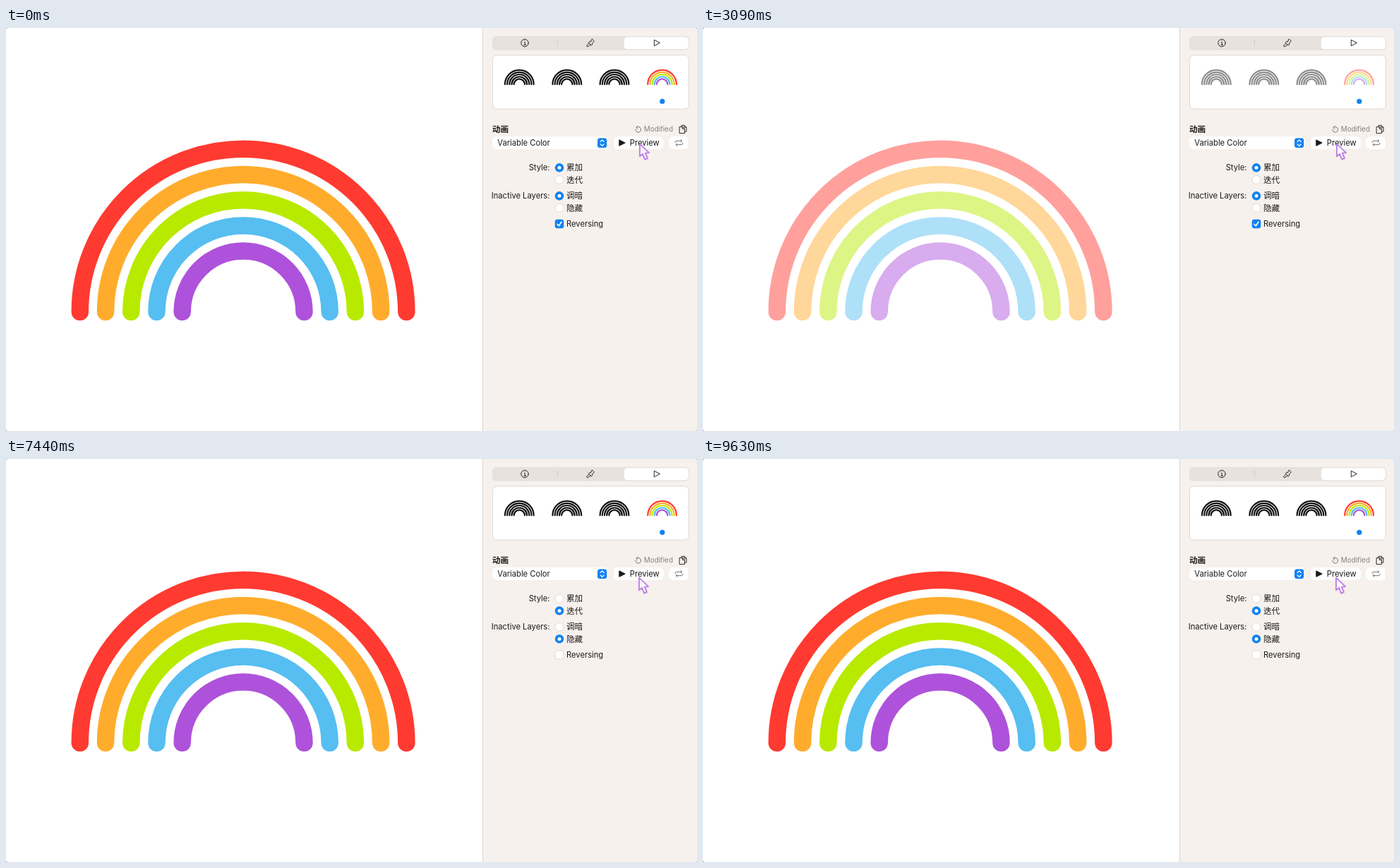
These frames come from a looping animation (979 px wide and 572 px high, 9.78 s). An HTML page:

```html
<!DOCTYPE html>
<html lang="en">
<head>
<meta charset="utf-8">
<title>Variable color preview</title>
<style>
  html, body { margin: 0; width: 100%; height: 100%; overflow: hidden; background: #555; }
  svg { display: block; width: 979px; height: 572px; }
  text { font: 11.2px Inter, "Noto Sans CJK SC", "Noto Sans CJK", sans-serif; fill: #1c1a19; }
  .zh { font: 11.6px "Noto Sans CJK SC", "Noto Sans CJK", sans-serif; }
  .bold { font-weight: 700; }
  .small { font-size: 9.9px; fill: #85807c; }
  .end { text-anchor: end; }
  .line { fill: none; stroke: #2a2827; stroke-linecap: round; stroke-linejoin: round; }
  .soft { stroke: #77726e; }
  .box { fill: #fff; filter: drop-shadow(0 .6px .7px #0003); }
  .arc { fill: none; stroke-width: 24.5; stroke-linecap: round; }
</style>
</head>
<body>
<svg viewBox="0 0 979 572">
  <defs>
    <g id="off"><circle r="6" fill="#fff" stroke="#d9d4cf" stroke-width=".8"/></g>
    <g id="on"><circle r="6.2" fill="#0f82f2"/><circle r="2.5" fill="#fff"/></g>
  </defs>

  <rect width="979" height="572" rx="2" fill="#fff"/>
  <path d="M675 0H977a2 2 0 0 1 2 2V570a2 2 0 0 1-2 2H675Z" fill="#f6f1ed"/>
  <path d="M675.5 0V572" stroke="#d9d5d1"/>

  <!-- tabs -->
  <rect x="689.5" y="12" width="278" height="19" rx="5" fill="#e7e2dd" stroke="#ddd8d3" stroke-width=".6"/>
  <path d="M781.5 16V26" stroke="#d0cbc6"/>
  <rect class="box" x="875.5" y="12.5" width="91.5" height="18" rx="5"/>
  <g class="line">
    <circle cx="735" cy="21.2" r="5.2"/>
    <path d="M734.3 20.6H735.3V23.8M734 23.9H736.5M735 18.4V18.5"/>
    <path d="M918.3 17.2V25.4L926 21.3Z"/>
    <path d="M830.5 15.8L833.4 18.6L830.3 21.8L831 23L829.2 24.6L825.2 20.7L827 18.8L828.1 19.5ZM826 21.5L822.8 24.8Q822.4 26.6 824.3 26.4L828.2 23.6"/>
  </g>

  <rect x="689.5" y="38.5" width="278" height="76.5" rx="6" fill="#fff" stroke="#dfdad6"/>
  <circle cx="929.8" cy="104.2" r="3.6" fill="#0f82f2"/>

  <!-- animation header -->
  <text class="zh bold" x="689" y="148">动画</text>
  <path class="line soft" d="M893.1 141.2A3.9 3.9 0 1 1 891.8 144M895.1 139.1L892.8 141.3L895 143.4"/>
  <text class="small" x="903.8" y="147">Modified</text>
  <path class="line" d="M957 140V138.2H961L964 141V147H961.5M954.5 140.2H958.5L961.4 143V149.4H954.5ZM958.3 140.4V143.2H961.2M961 138.3V141H963.8"/>

  <rect class="box" x="689" y="154" width="164" height="18" rx="5"/>
  <text x="696.3" y="167">Variable Color</text>
  <rect x="838" y="156.3" width="13.3" height="13.6" rx="3.5" fill="#1683f3"/>
  <path d="M842.2 161.3L844.7 158.9L847.2 161.3M842.2 164.9L844.7 167.3L847.2 164.9" class="line" style="stroke:#fff;stroke-width:1.3"/>
  <rect class="box" x="860.5" y="154" width="71.5" height="18" rx="5"/>
  <path d="M868.8 158.8V167.2L877.2 163Z" fill="#1c1a19" stroke="#1c1a19" stroke-linejoin="round"/>
  <text x="883.8" y="167">Preview</text>
  <rect class="box" x="939" y="154" width="28.5" height="18" rx="5"/>
  <path class="line soft" d="M948 162.4Q948 160.2 950 160.2H957.6M955.9 158.4L957.8 160.2L955.9 162M959 163.2Q959 165.6 957 165.6H949.2M951 163.8L949.1 165.6L951 167.4"/>

  <!-- options -->
  <text class="end" x="770.5" y="202">Style:</text>
  <text class="zh" x="794" y="202.3">累加</text>
  <text class="zh" x="794" y="219.5">迭代</text>
  <text class="end" x="770.5" y="242">Inactive Layers:</text>
  <text class="zh" x="794" y="242.3">调暗</text>
  <text class="zh" x="794" y="259.5">隐藏</text>
  <text x="794" y="282">Reversing</text>
  <use href="#off" x="784" y="198.3"/><use href="#off" x="784" y="215.4"/>
  <use href="#off" x="784" y="238.3"/><use href="#off" x="784" y="255.4"/>
  <use href="#on" x="784" y="198.3" id="style"/>
  <use href="#on" x="784" y="238.3" id="inactive"/>
  <rect x="778" y="272" width="12" height="12" rx="3" fill="#fff" stroke="#d9d4cf" stroke-width=".8"/>
  <g id="reversing">
    <rect x="777.8" y="271.8" width="12.4" height="12.4" rx="3" fill="#0f82f2"/>
    <path class="line" d="M781 278.4L783.2 281L787 275.2" style="stroke:#fff;stroke-width:1.6"/>
  </g>

  <g id="rainbows"></g>

  <circle id="ring" r="28.3" fill="#fff" fill-opacity=".12" stroke="#111" stroke-width="1.6"/>
  <path id="cursor" d="M0 0V17.6L4.1 14.2L7.2 22L10.9 20.4L7.7 13L13 12.5Z" fill="#fdf5ff" stroke="#b97be3" stroke-width="1.7" stroke-linejoin="round" style="filter:drop-shadow(.6px .8px .8px #b97be355)"/>
</svg>
<script>
const LOOP = 9780;
const COLORS = ['#ae52db', '#56bef0', '#b8ea00', '#ffac2d', '#ff3a31'];  // inside out
const $ = id => document.getElementById(id);

// Linear track through [time, value] points
function track(points, t, ease = p => p) {
  if (t <= points[0][0]) return points[0][1];
  for (let i = 1; i < points.length; i++) {
    const [a, from] = points[i - 1], [b, to] = points[i];
    if (t < b) return from + (to - from) * ease((t - a) / (b - a));
  }
  return points[points.length - 1][1];
}
const smooth = p => p * p * (3 - 2 * p);

// Cumulative run with reversing and dimming, then an iterative run with hiding
const layerTracks = COLORS.map((_, i) => {
  const rise = 825 + 150 * i, fall = 1950 + 150 * (4 - i);
  const show = 7970 + 190 * i, hide = 8320 + 190 * i;
  return [
    [560, 1], [780, .3], [rise, .3], [rise + 160, 1],
    [fall, 1], [fall + 165, .3], [3000, .3], [3360, 1],
    [7760, 1], [7950, 0], [show, 0], [show + 180, 1],
    [hide, 1], [hide + 180, 0], [9270, 0], [9630, 1]
  ];
});

const layers = COLORS.map(() => []);
function addRainbow(x, y, scale, ink) {
  const NS = 'http://www.w3.org/2000/svg';
  const group = document.createElementNS(NS, 'g');
  group.setAttribute('transform', `translate(${x} ${y}) scale(${scale})`);
  COLORS.forEach((color, i) => {
    const r = 86.4 + 36.22 * i;
    const arc = document.createElementNS(NS, 'path');
    arc.setAttribute('class', 'arc');
    arc.setAttribute('d', `M${-r} 0A${r} ${r} 0 0 1 ${r} 0`);
    arc.setAttribute('stroke', ink || color);
    group.append(arc);
    layers[i].push(arc);
  });
  $('rainbows').append(group);
}
addRainbow(336.1, 403, 1);
[727.3, 794.8, 862, 929.6].forEach((x, i) => addRainbow(x, 80, .088, i < 3 && '#111'));

const cursorX = [[4380, 898], [4860, 804], [5190, 804], [5550, 805], [6000, 805], [6150, 803.5], [6660, 803.5], [7440, 897]];
const cursorY = [[4380, 164.5], [4860, 217], [5190, 217], [5550, 256.5], [6000, 256.5], [6150, 276.5], [6660, 276.5], [7440, 168.5]];
const clicks = [540, 4920, 5700, 6360, 7740];
const PRESS = 150;

function draw(t) {
  layers.forEach((arcs, i) => {
    const opacity = track(layerTracks[i], t);
    arcs.forEach(arc => arc.style.opacity = opacity);
  });

  const x = track(cursorX, t, smooth), y = track(cursorY, t, smooth);
  $('cursor').setAttribute('transform', `translate(${x} ${y})`);

  const start = clicks.find(c => t >= c && t < c + PRESS);
  const press = start === undefined ? 1 : (t - start) / PRESS;
  $('ring').setAttribute('transform', `translate(${x - 1.2} ${y - 1.5}) scale(${1 - .3 * press})`);
  $('ring').style.opacity = 1 - press;

  $('style').setAttribute('y', t < clicks[1] + PRESS ? 198.3 : 215.4);
  $('inactive').setAttribute('y', t < clicks[2] + PRESS ? 238.3 : 255.4);
  $('reversing').style.opacity = t < clicks[3] + PRESS ? 1 : 0;
}

const origin = performance.now();
function tick() {
  draw((performance.now() - origin) % LOOP);
  requestAnimationFrame(tick);
}
tick();
</script>
</body>
</html>
```
